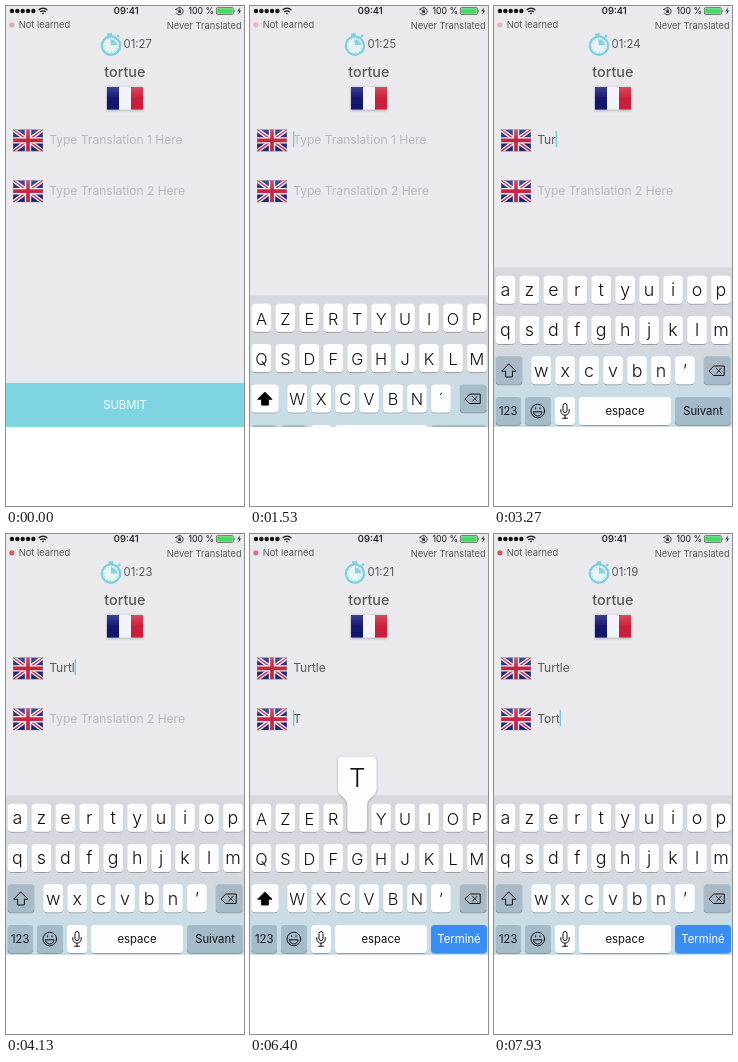
Animation, 238 px wide and 500 px high, one loop 8000 ms. Source, as an HTML page:

```html
<!DOCTYPE html>
<html lang="en">
<head>
<meta charset="utf-8">
<title>Translation quiz</title>
<style>
  html, body { margin: 0; width: 100%; height: 100%; overflow: hidden; background: #fff; }
  svg { display: block; width: 100%; height: 100%; }
  text { font-family: Inter, Roboto, sans-serif; fill: #58585c; }
  .small { font-size: 9.3px; }
  .status { font-size: 9.5px; fill: #111; }
  .field { font-size: 12.05px; }
  .mid { text-anchor: middle; }
  .key { text-anchor: middle; fill: #111; }
  .hint { fill: #b9bac0; }
  .line { fill: none; stroke: #111; stroke-width: 1; stroke-linejoin: round; stroke-linecap: round; }
</style>
</head>
<body>
<svg viewBox="0 0 238 500" preserveAspectRatio="xMidYMid meet">
  <defs>
    <clipPath id="screen"><rect width="238" height="421"/></clipPath>
    <clipPath id="flagBox"><rect width="30" height="22"/></clipPath>
    <linearGradient id="board" gradientUnits="userSpaceOnUse" x1="0" y1="262" x2="0" y2="421">
      <stop offset="0" stop-color="#d8d8df"/>
      <stop offset=".5" stop-color="#d4d8df"/>
      <stop offset=".8" stop-color="#c9dde6"/>
      <stop offset="1" stop-color="#c9dde6"/>
    </linearGradient>
    <linearGradient id="blue" x1="0" y1="0" x2="0" y2="1">
      <stop offset="0" stop-color="#3c4190"/>
      <stop offset=".5" stop-color="#14166f"/>
      <stop offset="1" stop-color="#10126c"/>
    </linearGradient>
    <linearGradient id="red" x1="0" y1="0" x2="0" y2="1">
      <stop offset="0" stop-color="#d64a5c"/>
      <stop offset=".5" stop-color="#cb1f3c"/>
      <stop offset="1" stop-color="#c8203c"/>
    </linearGradient>
    <linearGradient id="gloss" x1="0" y1="0" x2="0" y2="1">
      <stop offset="0" stop-color="#fff" stop-opacity=".2"/>
      <stop offset=".5" stop-color="#fff" stop-opacity="0"/>
      <stop offset="1" stop-color="#000" stop-opacity=".06"/>
    </linearGradient>
    <filter id="soft" x="-20%" y="-20%" width="140%" height="140%">
      <feDropShadow dx="0" dy="0.6" stdDeviation="1.2" flood-color="#50545c" flood-opacity=".5"/>
    </filter>
    <g id="uk">
      <g clip-path="url(#flagBox)">
        <rect width="30" height="22" fill="#1d2374"/>
        <path d="M0 0L30 22M30 0L0 22" stroke="#f1f1f6" stroke-width="4"/>
        <path d="M0 0L30 22M30 0L0 22" stroke="#c9243f" stroke-width="1.3"/>
        <path d="M15 0V22M0 11H30" stroke="#f1f1f6" stroke-width="6.4"/>
        <path d="M15 0V22M0 11H30" stroke="#c9243f" stroke-width="3.7"/>
        <rect width="30" height="22" fill="url(#gloss)"/>
      </g>
      <rect x=".3" y=".3" width="29.4" height="21.4" fill="none" stroke="#8d8fa0" stroke-opacity=".5" stroke-width=".6"/>
    </g>
  </defs>

  <g clip-path="url(#screen)">
    <rect width="238" height="421" fill="#e9e9ee"/>

    <g id="dots" fill="#111"></g>
    <g fill="none" stroke="#111" stroke-width="1.3">
      <path d="M32.6 4.1Q37 .2 41.4 4.1M34.4 6Q37 3.7 39.6 6"/>
      <path d="M35.9 7.2L37 8.6L38.1 7.2Q37 6.4 35.9 7.2Z" fill="#111" stroke="none"/>
    </g>
    <text class="status mid" x="120.3" y="8.4" font-weight="500">09:41</text>
    <g fill="none" stroke="#111" stroke-width=".8">
      <path d="M170.5 3.2A3.6 3.6 0 1 1 170.2 6.6M169.2 3.4L170.6 3L171.1 4.5"/>
      <rect x="172.2" y="4.6" width="2.8" height="2" fill="#111" stroke="none"/>
      <path d="M172.8 4.8V4A.8.8 0 0 1 174.4 4V4.8" stroke-width=".6"/>
    </g>
    <text class="status" x="208" y="8.4" text-anchor="end" style="font-size:8.7px">100 %</text>
    <rect x="210.4" y="1.5" width="17" height="7" rx="1.4" fill="none" stroke="#333" stroke-width=".6"/>
    <rect x="211.1" y="2.2" width="15.6" height="5.6" rx=".7" fill="#4cd964"/>
    <path d="M228.2 3.8Q229.5 5 228.2 6.2Z" fill="#333"/>
    <path d="M233.8 1.4L231.4 5.3H233L232.4 8.4L235 4.4H233.3Z" fill="#111"/>

    <circle id="alert" cx="5.9" cy="18.8" r="2.6" fill="#d94a5e"/>
    <text class="small" x="12.7" y="22">Not learned</text>
    <text class="small" x="235.7" y="22.6" text-anchor="end">Never Translated</text>

    <g id="watch">
      <path d="M102.6 27.2H107.4V30H102.6ZM111.5 31L113.4 29.3L115 31L113.2 32.7Z" fill="#7fd0de"/>
      <circle cx="105" cy="39.6" r="10.3" fill="#7fd0de"/>
      <circle cx="105" cy="39.6" r="8" fill="#e6f4f7"/>
      <circle cx="105" cy="39.6" r="7" fill="none" stroke="#8fd5e1" stroke-width="1.2" stroke-dasharray=".8 2.865"/>
      <path d="M105 39.6V33.4A6.2 6.2 0 0 1 111.2 39.6Z" fill="#86d3e0"/>
    </g>
    <text id="clock" x="117.6" y="42" font-size="11.3"></text>

    <text class="mid" x="118.8" y="71" font-size="14.3" font-weight="500">tortue</text>
    <g filter="url(#soft)">
      <rect x="101" y="81" width="36" height="22.6" fill="#f4f4f8"/>
      <rect x="101" y="81" width="12" height="22.6" fill="url(#blue)"/>
      <rect x="125" y="81" width="12" height="22.6" fill="url(#red)"/>
    </g>

    <use href="#uk" x="7" y="123.4"/>
    <use href="#uk" x="7" y="174.2"/>
    <text id="word1" class="field" x="43.2" y="138"></text>
    <text id="word2" class="field" x="43.2" y="189"></text>
    <rect id="caret" width="1.3" height="16" fill="#6fcbdc"/>

    <rect y="377" width="238" height="44" fill="#7fd4e1"/>
    <text class="mid" x="119" y="403" font-size="11.3" style="fill:#f4fbfc">SUBMIT</text>

    <rect id="back" width="238" height="160" fill="url(#board)"/>
    <g id="keys"></g>
    <g id="popup">
      <path filter="url(#soft)" fill="#fdfdfd" d="M-15 -47H15Q19.2 -47 19.2 -43V-15C19.2 -7 9.7 -7 9.7 2V24.5Q9.7 28 6.2 28H-6.2Q-9.7 28 -9.7 24.5V2C-9.7 -7 -19.2 -7 -19.2 -15V-43Q-19.2 -47 -15 -47Z"/>
      <text id="bubble" class="key" y="-16.5" font-size="26" font-weight="300"></text>
    </g>
  </g>
</svg>
<script>
const LOOP = 8000, NS = 'http://www.w3.org/2000/svg';
const $ = id => document.getElementById(id);

function add(parent, tag, attrs, text) {
  const el = document.createElementNS(NS, tag);
  for (const k in attrs) el.setAttribute(k, attrs[k]);
  if (text) el.textContent = text;
  parent.appendChild(el);
  return el;
}

for (let i = 0; i < 5; i++) add($('dots'), 'circle', { cx: 6 + i * 5.35, cy: 5, r: 2.2 });

// Keyboard, laid out in its resting place
const keys = $('keys'), WHITE = '#fdfdfd', DARK = 'rgba(55,90,118,.25)';
const rowY = [269.7, 310, 350.3, 391];

function cap(x, row, w, fill = WHITE) {
  const y = rowY[row];
  const edge = add(keys, 'path', {
    d: `M${x + .3} ${y + 25.5}q.3 3 3.4 3h${w - 7.4}q3.1 0 3.4 -3`,
    fill: 'none', stroke: '#8f949c', 'stroke-width': .9
  });
  keys.insertBefore(edge, keys.firstChild);
  return add(keys, 'rect', { x, y, width: w, height: 28, rx: 3.5, fill });
}

const letters = {}, spots = {};
['azertyuiop', 'qsdfghjklm', "wxcvbn'"].forEach((row, r) => {
  [...row].forEach((ch, i) => {
    const x = (r < 2 ? 11.4 : 47.2) + i * 23.95;
    cap(x - 9.7, r, 19.4);
    spots[ch] = [x, rowY[r]];
    letters[ch] = add(keys, 'text', { class: 'key', x, 'font-weight': 350 });
  });
});

const shiftKey = cap(1.5, 2, 27, DARK);
const arrow = add(keys, 'path', { class: 'line', d: 'M15 358.2L22 365.2H18.4V371H11.6V365.2H8Z' });
cap(209.7, 2, 27, DARK);
add(keys, 'path', { class: 'line', d: 'M215.3 364.7L219.8 360H230.2V369.4H219.8ZM222.6 362.4L227 367M227 362.4L222.6 367' });

cap(1.5, 3, 25.5, DARK);
cap(31, 3, 26, DARK);
cap(61, 3, 20);
cap(85, 3, 92);
const doneKey = cap(181, 3, 56, DARK);
const label = (x, text) => add(keys, 'text', { class: 'key', x, y: 409.2, 'font-size': 11.3 }, text);
label(14.2, '123');
label(131, 'espace');
const doneText = label(209, 'Suivant');
add(keys, 'circle', { class: 'line', cx: 43.8, cy: 405, r: 6.8 });
add(keys, 'path', { class: 'line', d: 'M39.6 405.8H48Q47.4 410 43.8 410T39.6 405.8ZM41.6 401.8V402.8M46 401.8V402.8' });
add(keys, 'rect', { class: 'line', x: 69, y: 397.5, width: 4, height: 9, rx: 2 });
add(keys, 'path', { class: 'line', d: 'M66.8 403.5V405A4.2 4.2 0 0 0 75.2 405V403.5M71 409.3V412.2M68.6 412.2H73.4' });

// Typing script
const FOCUS = 1355, NEXT = 5250;
const fields = [
  { word: 'Turtle', times: [2070, 2600, 3100, 3500, 3950, 4550], el: $('word1'), hint: 'Type Translation 1 Here', y: 125.2 },
  { word: 'Tort', times: [6360, 6900, 7300, 7750], el: $('word2'), hint: 'Type Translation 2 Here', y: 176.2 }
];
const count = (f, t) => f.times.filter(k => k <= t).length;

function setWord(f, t) {
  const n = count(f, t);
  f.el.textContent = n ? f.word.slice(0, n) : f.hint;
  f.el.classList.toggle('hint', !n);
}

function draw(t) {
  const pulse = .5 - .5 * Math.cos((t - 1570) / 1800 * 2 * Math.PI);
  $('alert').setAttribute('opacity', .3 + .65 * pulse);
  $('watch').setAttribute('transform', `rotate(${-8 + 8 * pulse} 105 39.6)`);
  $('clock').textContent = '01:' + (27 - Math.floor((t + 570) / 1000));

  fields.forEach(f => setWord(f, t));
  const second = t >= NEXT, f = fields[+second];

  // Caret trails the letter slightly and blinks when idle
  const n = count(f, t - 75);
  const last = n ? f.times[n - 1] : second ? NEXT : FOCUS;
  const caret = $('caret');
  caret.setAttribute('x', 43 + (n ? f.el.getSubStringLength(0, n) : 0));
  caret.setAttribute('y', f.y);
  caret.setAttribute('opacity', t >= FOCUS && (t - last) % 1000 < 650 ? 1 : 0);

  const p = Math.min(1, Math.max(0, (t - FOCUS) / 400));
  const drop = 160 * (1 - p) ** 3;
  $('back').setAttribute('y', 261.3 + drop);
  keys.setAttribute('transform', `translate(0 ${drop})`);

  const hit = f.times.findIndex(k => t >= k - 60 && t < k + 80);
  const typed = count(f, t);
  const upper = !typed || hit === 0;
  for (const ch in letters) {
    const el = letters[ch];
    el.textContent = ch === "'" ? (typed ? '’' : '´') : upper ? ch.toUpperCase() : ch;
    el.setAttribute('font-size', upper ? 16.3 : 17.8);
    el.setAttribute('y', spots[ch][1] + (upper ? 20.9 : 20.2));
  }
  shiftKey.setAttribute('fill', upper ? WHITE : DARK);
  arrow.style.fill = upper ? '#000' : 'none';
  doneKey.setAttribute('fill', second ? '#3a8df2' : DARK);
  doneText.textContent = second ? 'Terminé' : 'Suivant';
  doneText.style.fill = second ? '#fff' : '#111';

  $('popup').setAttribute('visibility', hit < 0 ? 'hidden' : 'visible');
  if (hit >= 0) {
    $('popup').setAttribute('transform', `translate(${spots[f.word[hit].toLowerCase()]})`);
    $('bubble').textContent = f.word[hit];
  }
}

const start = performance.now();
function tick() {
  draw((performance.now() - start) % LOOP);
  requestAnimationFrame(tick);
}
tick();
</script>
</body>
</html>
```
